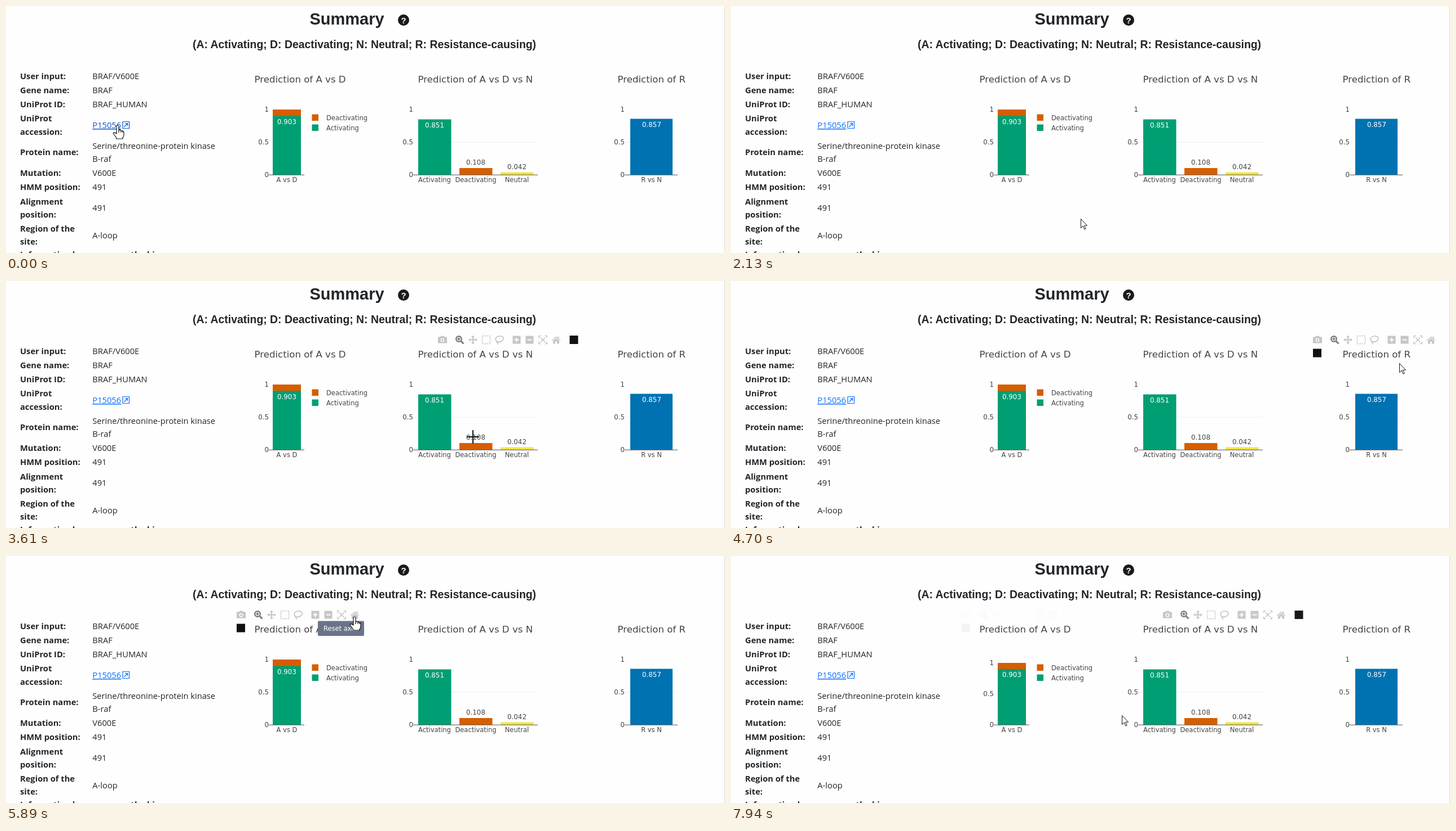
Animation, 1275 px wide and 439 px high, one loop 8000 ms. Source, as an HTML page:

```html
<!DOCTYPE html>
<html lang="en">
<head>
<meta charset="utf-8">
<title>Summary</title>
<style>
html, body { margin: 0; width: 100%; height: 100%; overflow: hidden; background: #fefefe; }
svg { display: block; width: 1275px; height: 439px; }
.table { font: 14.7px "Open Sans", sans-serif; fill: #212529; }
.key { font-weight: 700; }
.head { font: bold 29px "Liberation Sans", Arial, sans-serif; fill: #212529; text-anchor: middle; }
.sub { font-size: 19.4px; }
.plot { font: 11.5px "DejaVu Sans", Verdana, sans-serif; fill: #444; }
.num { font-size: 11.8px; }
.title { font-size: 16.6px; }
.mid { text-anchor: middle; }
.end { text-anchor: end; }
.white { fill: #fff; }
.link { text-decoration: underline; fill: inherit; }
.icon { opacity: .3; fill: #444; stroke: none; }
.icon.active { opacity: .7; }
.line { fill: none; stroke: #444; stroke-width: 2; }
</style>
</head>
<body>
<svg id="stage" viewBox="0 0 1275 439">
  <path d="M1274.5 0V439" stroke="#dcdcdc"/>
  <text class="head" x="604.5" y="33">Summary</text>
  <text class="head sub" x="635.5" y="75">(A: Activating; D: Deactivating; N: Neutral; R: Resistance-causing)</text>
  <circle cx="705" cy="25" r="10" fill="#1a1a1a"/>
  <text class="head white" x="705" y="30.5" style="font-size:15px">?</text>
  <g id="content"></g>
  <g id="link" class="table">
    <text class="link" x="153.3" y="217">P15056</text>
    <path id="external" d="M207 205.5h11.5v12H207zM209.5 215l6-6.5m-4.5 0h4.5v4.5" fill="none" stroke-width="1.2"/>
  </g>
  <g id="bars"></g>
  <g id="tip" class="plot">
    <rect y="115.5" height="26.5" rx="2" fill="#69738a"/>
    <text class="white" y="132.5"></text>
  </g>
  <g id="cursor" stroke-linejoin="round">
    <path id="arrow" d="M.5 .5V16.5l3.7-3.5 2.6 6 2.3-1-2.6-5.8h5z" fill="#fff" stroke="#111"/>
    <path id="hand" d="M-2 15V2a2 2 0 0 1 4 0V9q3-1.5 4 .8q2.5-.8 3 .9q2-.3 2 2V17q0 3-2 5v2H-2.5v-2q-2-3-4.8-6.5q-1-2 .8-2.6t4.5 2.1zM2 8v5M6 9.5V13M9 10.5V13" fill="#fff" stroke="#111" stroke-width="1.2"/>
    <path id="cross" d="M0-12V12M-11 0H11" stroke="#111" stroke-width="2"/>
  </g>
</svg>
<script>
const $ = id => document.getElementById(id);
const GREEN = '#009e73', ORANGE = '#d55e00', BLUE = '#0072b2', YELLOW = '#f0e442';

const text = (s, x, y, cls) => `<text x="${x}" y="${y}" class="${cls}">${s}</text>`;
const rect = (x, y, w, h, fill, id = '') => `<rect id="${id}" x="${x}" y="${y}" width="${w}" height="${h}" fill="${fill}"/>`;

const keys = [['User input:', 130], ['Gene name:', 155], ['UniProt ID:', 180], ['UniProt', 205], ['accession:', 229],
  ['Protein name:', 265], ['Mutation:', 302], ['HMM position:', 327], ['Alignment', 353], ['position:', 376],
  ['Region of the', 401], ['site:', 424], ['Information known across the kinases', 447]];
const values = [['BRAF/V600E', 130], ['BRAF', 155], ['BRAF_HUMAN', 180], ['Serine/threonine-protein kinase', 254],
  ['B-raf', 277], ['V600E', 302], ['491', 327], ['491', 364], ['A-loop', 413]];

const axes = (left, right, titleX, title) =>
  text(title, titleX, 136, 'plot title') +
  `<path class="grid" d="M${left} 242H${right}" stroke="#eee"/>` +
  ['1', '0.5', '0'].map((s, i) => text(s, left, 188 + 58 * i, 'plot num end tick')).join('');
const baseline = (left, right) => `<path d="M${left} 300.2H${right}" stroke="#555" stroke-width="1.1"/>`;
const label = (s, x) => text(s, x, 313, 'plot mid');
const value = (s, x, y, cls = '') => text(s, x, y, 'plot num mid ' + cls);

$('content').innerHTML =
  keys.map(([s, y]) => text(s, 25, y, 'table key')).join('') +
  values.map(([s, y]) => text(s, 153.3, y, 'table')).join('') +
  axes(466, 529, 440.5, 'Prediction of A vs D') +
  rect(473, 184, 50, 116, ORANGE, 'rest') + rect(473, 195.5, 50, 104.5, GREEN, 'share') +
  '<g id="shareText">' + value('0.903', 498, 210, 'white') + '</g>' +
  baseline(466, 529) + label('A vs D', 498) +
  rect(542.5, 192.5, 11.5, 11.5, ORANGE) + text('Deactivating', 568, 203, 'plot') +
  rect(542.5, 210.5, 11.5, 11.5, GREEN) + text('Activating', 568, 221, 'plot') +
  axes(722, 943, 730.5, 'Prediction of A vs D vs N') +
  rect(731, 201.5, 58.5, 98.5, GREEN) + rect(804, 288, 58.5, 12, ORANGE) + rect(877, 295.5, 58.5, 4.5, YELLOW) +
  value('0.851', 760, 216, 'white') + value('0.108', 833, 282) + value('0.042', 906, 290) +
  baseline(722, 943) + label('Activating', 760) + label('Deactivating', 833) + label('Neutral', 906) +
  axes(1097, 1191, 1084.5, 'Prediction of R') +
  rect(1107, 200.5, 75, 99.5, BLUE) + value('0.857', 1145, 215, 'white') +
  baseline(1097, 1191) + label('R vs N', 1144.5);

// Toolbar icons, each centred on 0,0
const icons = [
  [0, '<path fill-rule="evenodd" d="M-8-5h4l1.5-2h5L4-5h4V6H-8zM-3.5.5a3.5 3.5 0 0 0 7 0a3.5 3.5 0 0 0-7 0"/><circle cy=".5" r="2"/>'],
  [30.5, '<path class="line" d="M2.5 2.5L7 7" style="stroke-width:3"/><circle class="line" cx="-1.5" cy="-1.5" r="4.8" style="stroke-width:2.4"/><path class="line" d="M-4-1.5h5M-1.5-4v5"/>'],
  [54, '<path class="line" d="M-6 0H6M0-6V6"/><path d="M0-8l3 3.5h-6zM0 8l3-3.5h-6zM-8 0l3.5 3v-6zM8 0L4.5 3v-6z"/>'],
  [77.5, '<path class="line" d="M-7-7H7V7H-7z" stroke-dasharray="2 2"/>'],
  [101, '<path class="line" d="M-4 3C-9 0-7-6 0-6.5S9-2 5 1.5S-2 4-4 3q-2 1 0 2t1 3" style="stroke-width:1.7"/>'],
  [131.5, '<path fill-rule="evenodd" d="M-7-7H7V7H-7zM-1-4v3h-3v2h3v3h2V1h3v-2H1v-3z"/>'],
  [154.5, '<path fill-rule="evenodd" d="M-7-7H7V7H-7zM-4-1v2h8v-2z"/>'],
  [178, '<path class="line" d="M-4-4L4 4M4-4L-4 4M-7-3.5V-7h3.5M3.5-7H7v3.5M7 3.5V7H3.5M-3.5 7H-7V3.5" style="stroke-width:1.7"/>'],
  [201.5, '<path d="M-8 1L0-6l3 2.6V-6h2v4.4L8 1 7 2 0-4-7 2zM-5.5 2L0-2.7 5.5 2v5H1.5V3h-3v4h-4z"/>']
];
const bar = (x, logoX, logoY) => '<g>' +
  icons.map(([dx, d], i) => `<g class="icon ${i === 1 ? 'active' : ''}" transform="translate(${x + dx} 104.5)">${d}</g>`).join('') +
  rect(logoX, logoY, 15, 15, '#111') + '</g>';
$('bars').innerHTML = bar(417, 409, 120.5) + bar(774, 999.5, 97) + bar(1040, 1032, 120.5);
const bars = [...$('bars').children];
const autoscaleIcon = bars[0].children[7];

const LOOP = 8000, STEP = 134;

// Pointer waypoints: step, x, y
const path = [[0, 198, 212], [1, 197, 215], [2, 194, 240], [5, 181, 406], [6, 182, 417], [8, 182, 418], [9, 205, 417],
  [10, 317, 396], [11, 446, 368], [12, 490, 376], [14, 560, 387], [16, 620, 378], [17, 619, 345], [18, 610, 294],
  [19, 540, 270], [21, 422, 200], [22, 540, 176], [23, 653, 220], [25, 745, 250], [27, 828, 277], [30, 940, 298],
  [31, 1020, 273], [32, 1111, 251], [34, 1179, 193], [35, 1185, 146], [36, 1080, 95], [38, 880, 88], [41, 631, 109],
  [43, 624, 122], [44, 618, 108], [46, 600, 105], [50, 598, 107], [56, 598, 107], [57, 625, 145], [59, 693, 283]];
// Toolbar shown from each step on (0: none)
const shown = [[0, 0], [11.3, 1], [13.5, 0], [16.5, 1], [23.5, 2], [30.3, 3], [35.5, 2], [41.3, 1], [57, 2]];

function pointerAt(step) {
  const i = path.findIndex(p => p[0] >= step);
  if (i < 1) return path[i ? path.length - 1 : 0].slice(1);
  const [s0, x0, y0] = path[i - 1], [s1, x1, y1] = path[i];
  const k = (step - s0) / (s1 - s0);
  return [x0 + (x1 - x0) * k, y0 + (y1 - y0) * k];
}

function barOpacity(n, step) {
  const i = shown.findLastIndex(s => s[0] <= step);
  const p = Math.min(1, (step - shown[i][0]) / 2.25), k = p * p * (3 - 2 * p);
  const was = i > 0 && shown[i - 1][1] === n, is = shown[i][1] === n;
  return is ? k : was ? 1 - k : 0;
}

const show = (el, on) => el.setAttribute('visibility', on ? 'visible' : 'hidden');

function scaleFirstPlot(height) {
  const top = 300 - height, split = 300 - height * .901;
  $('rest').setAttribute('y', top);
  $('rest').setAttribute('height', height);
  $('share').setAttribute('y', split);
  $('share').setAttribute('height', 300 - split);
  $('shareText').setAttribute('transform', `translate(0 ${split - 195.5})`);
  const ticks = document.querySelectorAll('.tick');
  ticks[0].setAttribute('y', top + 4);
  ticks[1].setAttribute('y', 304 - height / 2);
  document.querySelector('.grid').setAttribute('d', `M466 ${300 - height / 2}H529`);
}

function setTip(s, x, width) {
  const [box, caption] = $('tip').children;
  box.setAttribute('x', x);
  box.setAttribute('width', width);
  caption.setAttribute('x', x + 10);
  caption.textContent = s;
}

function draw(t) {
  const step = Math.floor((t + 25) / STEP);
  const [x, y] = pointerAt(step);
  const hand = step < 2 || step >= 44 && step < 57;
  const inPlot = y > 184 && y < 300 && [[467, 529], [722, 942], [1097, 1191]].some(([a, b]) => x > a && x < b);
  $('cursor').setAttribute('transform', `translate(${x} ${y})`);
  show($('hand'), hand);
  show($('cross'), !hand && inPlot);
  show($('arrow'), !hand && !inPlot);

  const linkColor = step < 2 ? '#0a58ca' : '#0d6efd';
  $('link').style.fill = linkColor;
  $('external').setAttribute('stroke', linkColor);

  bars.forEach((b, i) => b.setAttribute('opacity', barOpacity(i + 1, step)));
  const autoscale = step >= 46 && step < 57;
  autoscaleIcon.classList.toggle('active', autoscale);
  show($('tip'), step === 44 || autoscale);
  if (autoscale) setTip('Autoscale', 537, 75);
  else setTip('Reset axes', 553, 82);
  scaleFirstPlot(t >= 7390 ? 110 : 116);
}

function frame() {
  draw(performance.now() % LOOP);
  requestAnimationFrame(frame);
}
frame();
</script>
</body>
</html>
```
